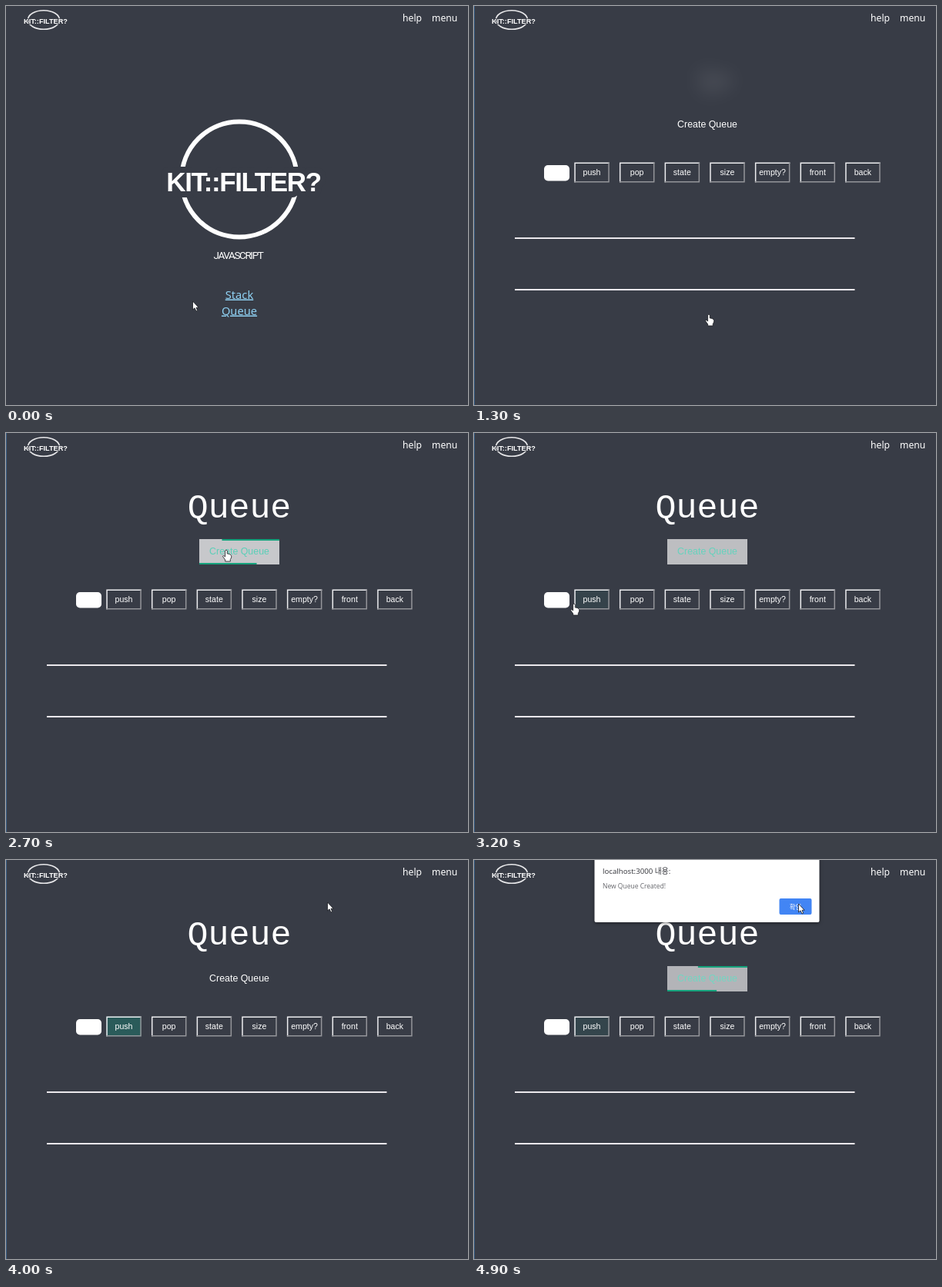
Recreate the animation shown at these times as an HTML page. Size 600 px wide and 519 px high, loop 5 s.

```html
<!DOCTYPE html>
<html>
<head>
<meta charset="utf-8">
<style>
html, body { margin: 0; width: 100%; height: 100%; overflow: hidden; background: #383c46; }
svg { display: block; width: 100%; height: 100%; }
text { fill: #fff; }
.ui { font-family: "Noto Sans", "Open Sans", sans-serif; }
.arial { font-family: "Liberation Sans", Arial, sans-serif; }
.mid { text-anchor: middle; }
.brand { font-family: "Liberation Sans", Arial, sans-serif; font-weight: bold; text-anchor: middle;
  stroke: #383c46; stroke-linejoin: round; paint-order: stroke; }
.link { font-size: 14.7px; fill: #8ed0f2; text-decoration: underline; }
#title { font: 45px "Liberation Mono", "Courier New", monospace; }
.dialog { font-family: "Open Sans", "Noto Sans CJK KR", "Noto Sans CJK", sans-serif; }
.dialog rect:first-child { filter: drop-shadow(0 1px 2px rgba(0,0,0,.5)); }
</style>
</head>
<body>
<svg viewBox="0 0 600 519">
  <rect width="600" height="519" fill="#383c46"/>
  <ellipse cx="49" cy="18" rx="20.5" ry="12.3" fill="none" stroke="#e8e8ea" stroke-width="1.6"/>
  <text class="brand" x="51.5" y="22.5" font-size="9.2" stroke-width="1.5">KIT::FILTER?</text>
  <text class="ui" x="515" y="19.5" font-size="12.2">help</text>
  <text class="ui" x="553" y="19.5" font-size="12.2">menu</text>

  <g id="home">
    <circle cx="303" cy="225.5" r="75" fill="none" stroke="#fff" stroke-width="6"/>
    <text class="brand" x="308.5" y="241" font-size="35" letter-spacing="-1.4" stroke-width="16">KIT::FILTER?</text>
    <text class="mid" x="301.5" y="328.5" font-family="Roboto, sans-serif" font-size="13.5" letter-spacing="-1.4">JAVASCRIPT</text>
    <text class="ui mid link" x="303" y="380.5">Stack</text>
    <text class="ui mid link" x="303" y="401.5">Queue</text>
  </g>

  <g id="queue">
    <rect width="1" height="519" fill="#3b6088"/>
    <text id="title" class="mid" x="303" y="110">Queue</text>
    <rect id="create" x="251" y="138" width="104" height="33"/>
    <rect id="top" y="138" height="2" fill="#16a37d"/>
    <rect id="bottom" x="251" y="169" height="2" fill="#16a37d"/>
    <text id="label" class="arial mid" x="303" y="158" font-size="12.4">Create Queue</text>
    <rect x="91" y="207" width="33" height="20.5" rx="5" fill="#fff"/>
    <g id="tools"></g>
    <path d="M53 302H494.5M53 369H494.5" stroke="#ebe8ec" stroke-width="2"/>
  </g>

  <g id="alerts"></g>

  <g id="cursor" fill="#fff" stroke="#16181e" stroke-width=".8" stroke-linejoin="round">
    <path id="arrow" d="M-.5 0V11L2 8.800L4 13L5.700 12.200L4 8.200H7.200Z"/>
    <path id="hand" d="M-1.400 1Q0 -.8 1.300 1V5Q4.500 4.500 6.700 7.500V10L5.300 12.500V15H-1.300V13L-4.500 8.500Q-4 6.600 -1.400 9Z"/>
  </g>
</svg>
<script>
const $ = id => document.getElementById(id);
const set = (el, attrs) => { for (const k in attrs) el.setAttribute(k, attrs[k]); };
const show = (el, on) => { el.style.display = on ? '' : 'none'; };
const ramp = (t, from, to) => Math.max(0, Math.min(1, (t - from) / (to - from)));
const lerp = (a, b, k) => a + (b - a) * k;
const mix = (a, b, k) => `color-mix(in srgb, ${b} ${100 * k}%, ${a})`;
const BG = '#383c46', TEAL = '#1abc9c', DEEP = '#28605e';

$('tools').innerHTML = ['push', 'pop', 'state', 'size', 'empty?', 'front', 'back'].map((name, i) =>
  `<g transform="translate(${130.3 + i * 58.65} 203.5)">
    <rect width="45.5" height="26" fill="${BG}"/>
    <path d="M.75 26V.75H45.5" fill="none" stroke="#ededf0" stroke-width="1.5"/>
    <path d="M0 25.25H44.75V0" fill="none" stroke="#94959a" stroke-width="1.5"/>
    <text class="arial mid" x="22.7" y="16.5" font-size="10.6">${name}</text>
  </g>`).join('');
const push = $('tools').querySelector('rect');

$('alerts').innerHTML = ['Initialize Queue!! Please press start button', 'New Queue Created!'].map(msg =>
  `<g class="dialog">
    <rect x="156.5" y="-20" width="292" height="101" rx="2" fill="#fff"/>
    <text x="167" y="18" font-size="9.7" style="fill:#33343a">localhost:3000 내용:</text>
    <text x="167" y="36.5" font-size="8.5" style="fill:#66676c">${msg}</text>
    <rect x="396.5" y="50" width="42" height="21" rx="2" fill="#4285f4"/>
    <text class="mid" x="417.5" y="63.5" font-size="8.5">확인</text>
  </g>`).join('');
const dialogs = [...$('alerts').children];

// Each move: start, end, then the point reached
const moves = [
  [0, 300, 255, 440], [300, 700, 305, 401], [1300, 1800, 112, 196], [1800, 2100, 232, 164],
  [2100, 2700, 286, 152], [3000, 3200, 130, 222], [3200, 3500, 199, 208], [3500, 3800, 418, 55],
  [4000, 4300, 326, 162], [4500, 4900, 422, 57]
];
const pointer = t => moves.reduce(([x, y], [from, to, nx, ny]) => {
  const k = ramp(t, from, to);
  return [lerp(x, nx, k), lerp(y, ny, k)];
}, [243, 384]);

// Clickable areas: the link, the create button and the tool row
const hot = [[280, 390, 46, 15], [251, 138, 104, 33], [130, 203, 398, 27]];
const isHot = (x, y) => hot.some(([l, t, w, h]) => x >= l && x <= l + w && y >= t && y <= t + h);

function draw(t) {
  show($('home'), t < 1200);
  show($('queue'), t >= 1200);

  // The title comes into focus while its letters spread
  const rest = (1 - ramp(t, 1230, 2830)) ** 2;
  $('title').style.letterSpacing = -.5 * rest + 'em';
  $('title').style.filter = rest ? `blur(${12 * rest}px)` : 'none';
  $('title').style.opacity = 1 - rest;

  // Hover effects freeze while a dialog is open
  const p = ramp(t, 2270, 2870) - ramp(t, 3000, 3600) + ramp(Math.min(t, 4470), 4100, 4700);
  const w = t > 3000 && t < 4000 ? 0 : 104 * p;
  $('create').style.fill = mix(BG, '#fff', p);
  $('label').style.fill = mix('#fff', TEAL, p);
  set($('top'), { x: 355 - w, width: w });
  set($('bottom'), { width: w });
  push.style.fill = mix(BG, DEEP, ramp(t, 3150, 3400) - .76 * ramp(t, 3900, 4400));

  const fades = [ramp(t, 3400, 3600) - ramp(t, 3900, 4000), ramp(t, 4400, 4600)];
  dialogs.forEach((d, i) => {
    show(d, fades[i]);
    set(d, { opacity: fades[i], transform: `translate(0 ${-14 * (1 - fades[i])})` });
  });

  const [x, y] = pointer(t), hand = isHot(x, y) && !fades.includes(1);
  show($('hand'), hand);
  show($('arrow'), !hand);
  set($('cursor'), { transform: `translate(${x} ${y})` });
}

function frame() {
  draw(Math.floor(performance.now() % 5000 / 100) * 100);
  requestAnimationFrame(frame);
}
frame();
</script>
</body>
</html>
```
